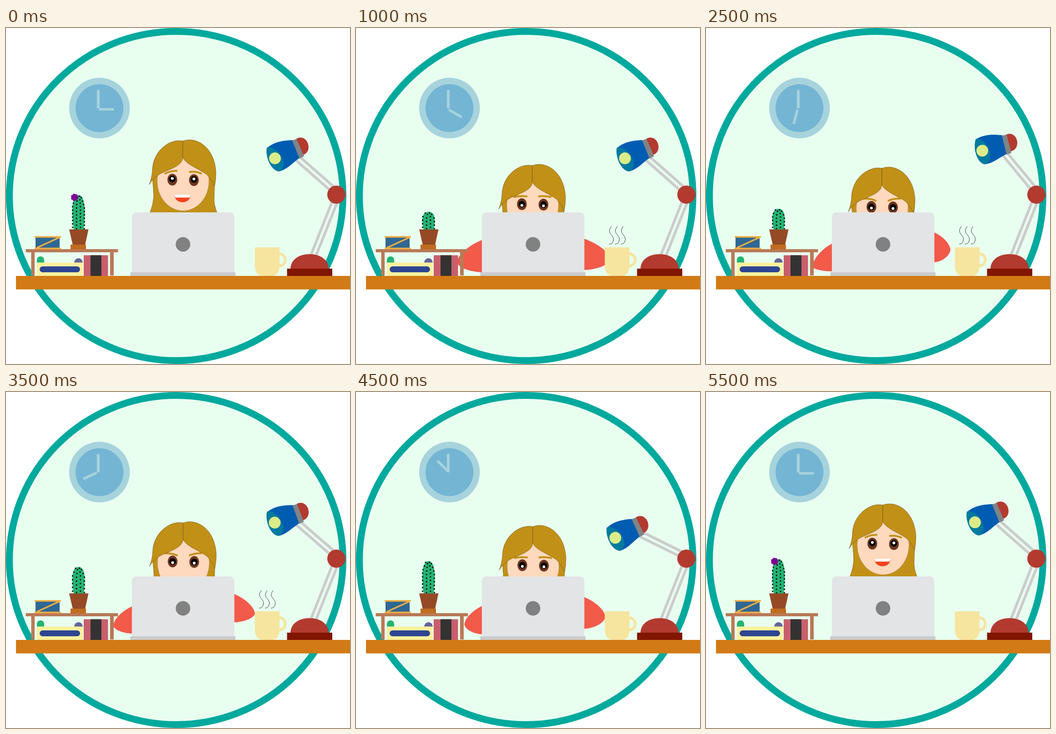
An HTML page that plays this animation: 757x740 px, repeating every 6000 ms.

```html
<!DOCTYPE html>
<html lang="en">
<head>
<meta charset="utf-8">
<title>Desk day</title>
<style>
html, body { margin: 0; width: 100%; height: 100%; overflow: hidden; background: #fff; }
svg { display: block; width: 100vw; height: 100vh; }
.hair { fill: #c19016; stroke: #6e5220; stroke-width: .7; }
.brow { fill: none; stroke: #c19016; stroke-width: 4; }
.rod { stroke: #ccc; stroke-width: 6; }
.red { fill: #b33a2f; }
.mug { fill: #f6e59f; }
.wood { fill: #b97a57; }
.hand { stroke: #a6d3dc; stroke-width: 5.5; stroke-linecap: round; }
.steam { fill: none; stroke: #222; stroke-width: .9; }
</style>
</head>
<body>
<svg viewBox="0 0 757 740" preserveAspectRatio="none">
  <ellipse cx="374.5" cy="370" rx="367" ry="362.5" fill="#e8fff0" stroke="#00a99d" stroke-width="15"/>

  <circle cx="205.7" cy="176.3" r="66.7" fill="#a6d3dc"/>
  <circle cx="205.7" cy="176.5" r="52.7" fill="#74b5d4"/>
  <path d="M200 177V139Q200 136 203 136Q206 136 206 139V177Z" fill="#a6d3dc"/>
  <line id="hour" class="hand"/>

  <path id="arms" fill="#f25a4a"/>

  <g id="head">
    <path class="hair" d="M323 310C321 335 325 350 325 372Q324 388 317 406V480H464V406Q457 388 458 372L460 310Z"/>
    <ellipse cx="389.7" cy="337" rx="57" ry="65.5" fill="#ffd9bd" stroke="#a5805f" stroke-width=".6"/>
    <path fill="#f4421f" d="M371 368H406C406 389 371 389 371 368Z"/>
    <path fill="#fff" d="M371 367.5H406Q406 371 404 373.5H373Q371 371 371 367.5Z"/>
    <g id="eyes"></g>
    <path id="brows" class="brow"/>
    <path class="hair" d="M389 249C362 243 326 268 322.5 308Q322 328 315 345Q323 331 338 322C358 311 388 305 389 285Z"/>
    <path class="hair" d="M389 249C418 238 459 261 462 318Q462 335 459 349Q455 336 441 322C424 310 395 300 389 285Z"/>
  </g>
  <rect id="sip" x="364.5" y="391.5" width="54" height="24" class="mug" stroke="#b09a58" stroke-width=".7"/>

  <path fill="#e2e4e6" d="M277 540V418Q277 406 289 406H490Q502.5 406 502.5 418V540Z"/>
  <rect x="273.5" y="538" width="231.5" height="9" fill="#c9cbcd"/>
  <circle cx="389.5" cy="476.5" r="16" fill="#808180"/>

  <path fill="#24b373" d="M68 517V511A8 8 0 0 1 84 511V517Z"/>
  <path fill="#65639a" d="M150 517A9.5 10 0 0 1 169 517Z"/>
  <rect x="68" y="516.5" width="101.5" height="29.5" fill="#fbf19f"/>
  <rect x="74" y="525" width="89" height="13" rx="6.5" fill="#2d4591"/>
  <rect x="171" y="500.5" width="53.5" height="46" fill="#c85f6c"/>
  <rect x="186" y="500.5" width="24" height="46" fill="#333"/>
  <path class="wood" d="M43.5 487H246.5V494H237V545H229V494H63V545H55.5V494H43.5Z"/>
  <rect x="65" y="460" width="53" height="25" fill="#2f6893"/>
  <path stroke="#f3ae43" stroke-width="3.5" d="M63 460H121M63 485.5H121M68 484L118 461"/>

  <g id="cactus"></g>
  <path fill="#944a25" d="M139 443.5H181.5L174 478H147Z"/>
  <rect x="142" y="477" width="34" height="10.5" fill="#c06c20"/>

  <g id="cup">
    <circle cx="601" cy="510.5" r="13.5" fill="none" stroke="#f6e59f" stroke-width="6"/>
    <path class="mug" d="M547.5 483H602V522Q602 546.5 582 546.5H568Q547.5 546.5 547.5 522Z"/>
  </g>
  <path id="steam" class="steam"/>

  <path class="rod" d="M671 500L717 384M682 502L728 386"/>
  <path id="boom" class="rod" d="M639 292L715 359M648 285L724 352"/>
  <g id="shade">
    <path fill="#005cb0" d="M575 264C590 250 614 247 632 247L648 285C630 297 620 311 601 316Z"/>
    <path fill="#007b9f" d="M575 263C591 259 614 284 611 303Q608 314 601 316C584 315 570 284 574 264Z"/>
    <circle cx="592" cy="287" r="13" fill="#dcec88"/>
    <path class="red" d="M639 244C650 237 662 244 665 256C668 268 663 276 653 280Z"/>
    <path fill="#808486" d="M630 248L639.5 244L656 282.5L646 287.5Z"/>
  </g>
  <circle class="red" cx="727" cy="367" r="20"/>
  <path class="red" d="M626 531C626 510 645 498 668 498C691 498 710 510 710 531Z"/>
  <rect x="618.5" y="530" width="99.5" height="17" fill="#801500"/>
  <rect x="22" y="546" width="735" height="29.7" fill="#d17a16"/>
</svg>
<script>
const STEP = 500, STEPS = 12, RAD = Math.PI / 180;
const $ = id => document.getElementById(id);
const set = (id, attrs) => { for (const k in attrs) $(id).setAttribute(k, attrs[k]); };
const show = (id, on) => { $(id).style.display = on ? '' : 'none'; };
const dot = (x, y, r, fill) => `<circle cx="${x}" cy="${y}" r="${r}" fill="${fill}"/>`;

// Key poses by step; the steps between are blended
const HOUR = { 1: [3], 4: [6], 5: [6.5], 8: [9], 10: [12], 11: [15] };
const CACTUS = { 0: [368], 1: [407], 5: [398], 10: [366], 11: [368] };
const HEAD = { 0: [0, 0], 2: [-1, 54], 3: [-3, 71], 5: [-2, 60], 8: [2, 29], 10: [-2, 66], 11: [0, 0] };
// boom swing, shade tilt
const LAMP = { 0: [0, 0], 1: [4, 4], 2: [0, 0], 3: [-13, -13.5], 4: [-13, -13.5],
  5: [9, 8.5], 8: [-5, -1], 10: [-25, -4], 11: [0, 0] };
// top y, tip x, tip y, bottom y
const LEFT = { 2: [467, 222, 516, 538], 5: [475, 234, 526, 536], 8: [471, 237, 509, 530], 10: [472, 240, 515, 537] };
const RIGHT = { 2: [464, 560, 510, 533], 5: [450, 538, 488, 516], 8: [442, 553, 488, 503], 10: [461, 545, 502, 540] };

const BROWS = {
  happy: 'M349 321Q362 314 377 314.5M403 317Q418 315 431 321',
  flat: 'M348 318.5Q362 315 378 317M402 317Q416 315 431 318.5',
  angry: 'M348 316Q364 315 377 321M402 321Q415 315 430 316'
};

function pose(keys, i) {
  const steps = Object.keys(keys).map(Number);
  const a = steps.filter(s => s <= i).pop() ?? steps[0];
  const b = steps.find(s => s > i) ?? a;
  const k = b > a ? Math.max(0, i - a) / (b - a) : 0;
  return keys[a].map((v, n) => v + (keys[b][n] - v) * k);
}

function arm(x, [top, tipX, tipY, bottom]) {
  const px = k => x + (tipX - x) * k;
  const up = k => top + (tipY - top) * k, down = k => tipY + (bottom - tipY) * k;
  return `M${x} ${top}C${px(.45)} ${up(.2)} ${px(.95)} ${up(.6)} ${tipX} ${tipY}` +
    `C${px(.96)} ${down(.45)} ${px(.55)} ${down(.95)} ${x} ${bottom}Z`;
}

function eyes(happy) {
  const pupil = happy ? -1.5 : 0, glint = happy ? -2.7 : 2.5;
  return [[366, 334], [413.5, 335]].map(([x, y]) =>
    `<ellipse cx="${x}" cy="${y}" rx="10.7" ry="13" fill="#6d351f"/>` +
    dot(x, y + pupil, 7.2, '#000') + dot(x, y + glint, 3.1, '#fff')).join('');
}

function cactus(top) {
  const tall = 444 - top, bend = 444 - tall * .55;
  let out = `<path fill="#24b373" d="M149 444C143 ${bend} 145 ${top} 160 ${top}C174 ${top} 176 ${bend} 171 444Z"/>`;
  const rows = Math.round(tall / 8);
  for (let r = 0; r < rows; r++) {
    const k = (r + .35) / rows, half = 13 * Math.min(1, .4 + k * 2);
    for (let c = 0; c < 4; c++) {
      out += dot(159.5 + half * (c / 1.5 - 1), top + k * tall + c % 2 * 3, 1.6, '#000');
    }
  }
  return out;
}

function flower() {
  let out = dot(151, 373, 4.5, '#7d0098');
  for (let a = 0; a < 7; a++) {
    const t = a * Math.PI * 2 / 7;
    out += dot(151 + 5 * Math.cos(t), 373 + 5 * Math.sin(t), 3.2, '#7d0098');
  }
  return out;
}

function drawClock(i) {
  const a = pose(HOUR, i)[0] * 30 * RAD, sin = Math.sin(a), cos = Math.cos(a);
  const x = 202 + 3.7 * Math.max(0, cos), y = 177.7 + 1.2 * sin;
  set('hour', { x1: x + 5 * sin, y1: y - 5 * cos, x2: x + 33 * sin, y2: y - 33 * cos });
}

// The bulb swings round the elbow, and reaches further out as it sinks
function drawLamp(i) {
  const [swing, tilt] = pose(LAMP, i);
  const a = (30.6 + swing * .95) * RAD, reach = 157 - swing * .4;
  const x = 727 - reach * Math.cos(a), y = 367 - reach * Math.sin(a);
  set('boom', { transform: `rotate(${swing} 727 367)` });
  set('shade', { transform: `translate(${x} ${y}) rotate(${tilt}) translate(-592 -287)` });
}

function draw(i) {
  const working = i > 1 && i < 11, sipping = i === 8;
  const happy = i % 11 === 0;
  const mood = happy ? 'happy' : i >= 5 && i <= 8 ? 'angry' : 'flat';

  drawClock(i);
  drawLamp(i);
  set('head', { transform: `translate(${pose(HEAD, i)})` });
  set('brows', { d: BROWS[mood] });
  $('eyes').innerHTML = eyes(happy);
  set('arms', { d: working ? arm(277, pose(LEFT, i)) + arm(502, pose(RIGHT, i)) : '' });

  const bloom = happy ? flower() : i === 10 ? dot(153, 372, 6, '#b900a5') : '';
  $('cactus').innerHTML = cactus(pose(CACTUS, i)[0]) + bloom;

  show('sip', sipping);
  show('cup', !sipping);
  show('steam', working && (i % 5 === 0 || i % 5 === 2));
}

set('steam', {
  d: [562, 575, 588].map(x =>
    `M${x} 437C${x - 12} 453 ${x + 6} 454 ${x + 4.5} 467Q${x + 3} 476 ${x - 5} 476`).join('')
});

let shown = -1;
const start = performance.now();
function tick(now) {
  const i = Math.floor(Math.max(0, now - start) / STEP) % STEPS;
  if (i !== shown) draw(shown = i);
  requestAnimationFrame(tick);
}
tick(start);
</script>
</body>
</html>
```
